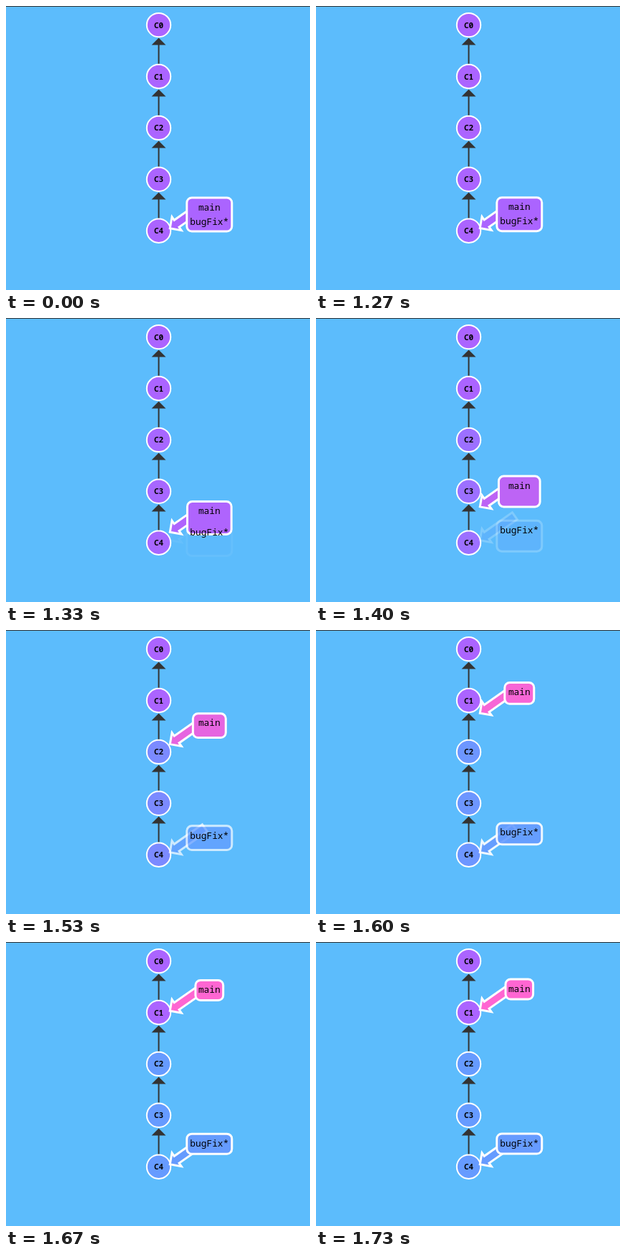
An HTML page that plays this animation: 425x397 px, repeating every 1790 ms.

```html
<!DOCTYPE html>
<html lang="en">
<head>
<meta charset="utf-8">
<title>Branch move</title>
<style>
  html, body { margin: 0; width: 100%; height: 100%; overflow: hidden; background: #5cbcfc; }
  svg { display: block; width: 425px; height: 397px; }
  text { font-family: "Noto Sans Mono", "DejaVu Sans Mono", monospace; text-anchor: middle; fill: #000; }
  .commit text { font-size: 11px; font-weight: 700; }
  .commit circle { stroke: #fff; stroke-width: 2; }
  .edge { fill: #333; }
  .tag { stroke: #fff; stroke-width: 3; }
  .name { font-size: 12.83px; }
</style>
</head>
<body>
<svg viewBox="0 0 425 397">
  <rect width="425" height="1" fill="#333"/>
  <g id="tree"></g>
  <g id="labels"></g>
</svg>
<script>
const LOOP = 1790;
const MOVE_START = 1259, MOVE_TIME = 437;
const STEPS = [1270, 1330, 1400, 1470, 1530, 1600, 1670, 1730];
const PURPLE = [171, 100, 255], BLUE = [102, 155, 255], PINK = [255, 102, 210];
const CENTER = 213.5, LABEL_X = 284.3;

const tree = document.getElementById('tree');
const labels = document.getElementById('labels');

function add(parent, tag, attrs = {}, text = '') {
  const node = document.createElementNS('http://www.w3.org/2000/svg', tag);
  set(node, attrs);
  node.textContent = text;
  return parent.appendChild(node);
}

function set(node, attrs) {
  for (const key in attrs) node.setAttribute(key, attrs[key]);
}

const mix = (a, b, p) => a + (b - a) * p;
const blend = (a, b, p) => `rgb(${a.map((v, i) => Math.round(mix(v, b[i], p)))})`;

// cubic-bezier(.42, 0, .58, 1)
function easeInOut(x) {
  if (x <= 0) return 0;
  if (x >= 1) return 1;
  let low = 0, high = 1;
  for (let i = 0; i < 24; i++) {
    const u = (low + high) / 2, v = 1 - u;
    const at = 3 * v * v * u * 0.42 + 3 * v * u * u * 0.58 + u * u * u;
    if (at < x) low = u; else high = u;
  }
  return low * low * (3 - 2 * low);
}

const circles = [0, 1, 2, 3, 4].map(i => {
  const y = 26.6 + 71.9 * i;
  if (i < 4) {
    const top = 44.5 + 72 * i;
    add(tree, 'path', {
      class: 'edge',
      d: `M${CENTER} ${top}l10 10h-9v27h-2v-27h-9z`
    });
  }
  const commit = add(tree, 'g', { class: 'commit' });
  const circle = add(commit, 'circle', { cx: CENTER, cy: y, r: 16.7, fill: blend(PURPLE, PURPLE, 0) });
  add(commit, 'text', { x: CENTER, y: Math.round(y + 4) }, `C${i}`);
  return circle;
});

function makeLabel(name) {
  return {
    arrow: add(labels, 'path', {
      class: 'tag',
      d: 'M0 0L11.5-11.5V-6H59.4V6H11.5V11.5Z'
    }),
    box: add(labels, 'rect', { class: 'tag', rx: 7 }),
    text: add(labels, 'text', { class: 'name', x: LABEL_X }, name)
  };
}

const bugFix = makeLabel('bugFix*');
const main = makeLabel('main');
labels.append(bugFix.text, main.text);

function place(label, { arrowY, top, height, half, baseline, fill, opacity }) {
  set(label.arrow, { transform: `translate(229.2 ${arrowY}) rotate(-35)`, fill, opacity });
  set(label.box, { x: LABEL_X - half, y: top, width: half * 2, height, fill, opacity });
  set(label.text, { y: Math.floor(baseline) });
}

function draw(time) {
  const step = STEPS.filter(s => s <= time).pop() || 0;
  const p = easeInOut((step - MOVE_START) / MOVE_TIME);
  const height = mix(47, 28, p);

  circles.slice(2).forEach(c => set(c, { fill: blend(PURPLE, BLUE, p) }));
  place(main, {
    arrowY: mix(310.8, 94.8, p), top: mix(268, 52, p), height,
    half: mix(31.5, 19.3, p), baseline: mix(286, 70, p),
    fill: blend(PURPLE, PINK, p), opacity: 1
  });
  place(bugFix, {
    arrowY: 310.8, top: mix(287.5, 268, p), height,
    half: 31.5, baseline: mix(306, 286, p),
    fill: blend(BLUE, BLUE, 0), opacity: p
  });
}

const start = performance.now();
function tick() {
  draw((performance.now() - start) % LOOP);
  requestAnimationFrame(tick);
}
tick();
</script>
</body>
</html>
```
